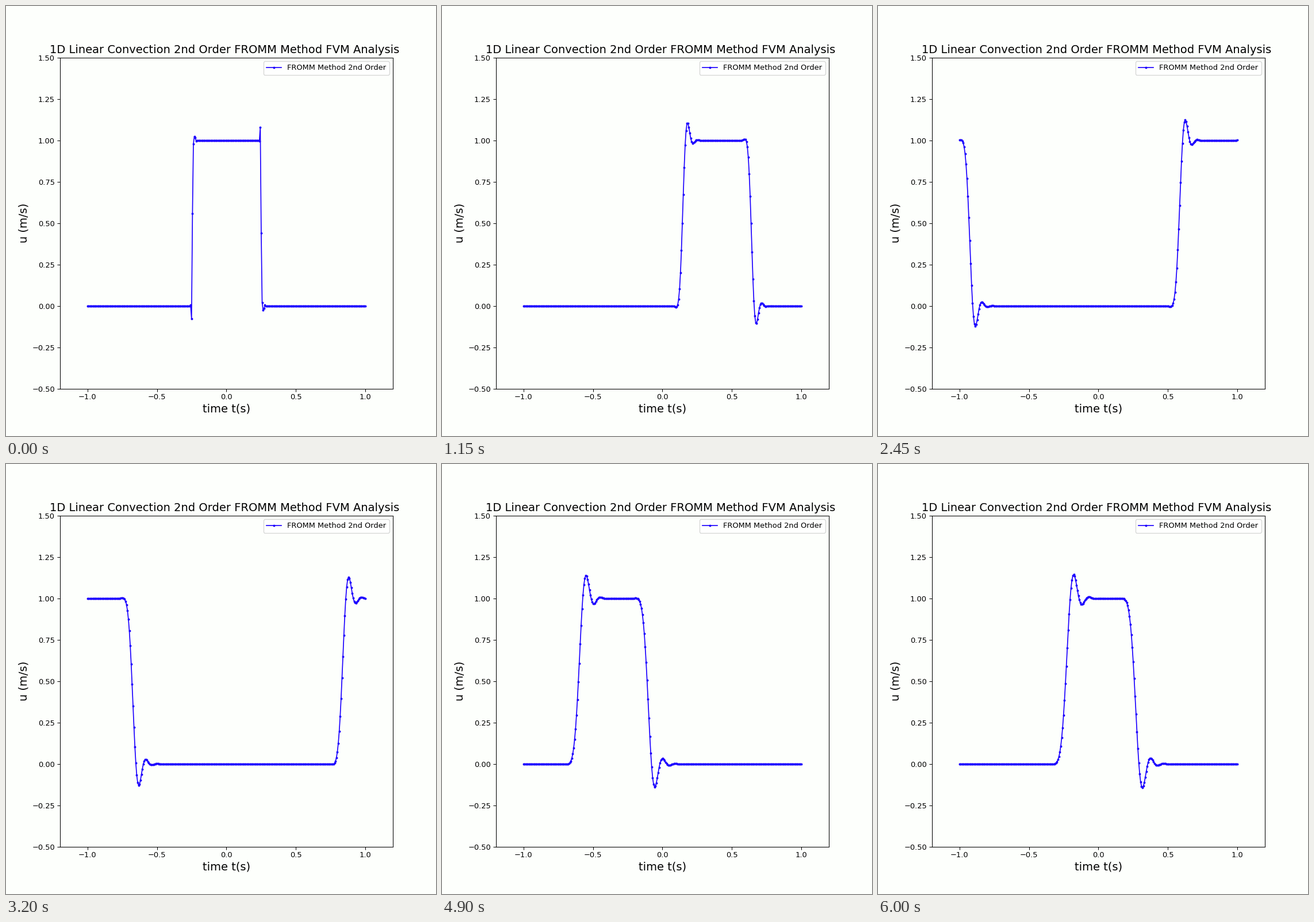
A matplotlib script for the animation above (6.05 s loop, 748 px wide and 748 px high).

```python
import numpy as np
import matplotlib.pyplot as plt
from matplotlib.animation import FuncAnimation

plt.rcParams["font.family"] = "DejaVu Sans"

CELLS = 300
CFL = 0.5
STEPS_PER_FRAME = 5
FRAMES = 121
PAPER = "#fdfffc"
BLUE = "#1c00ff"


def flux_balance(u):
    """Fromm reconstruction for unit wave speed on a periodic grid."""
    slope = (np.roll(u, -1) - np.roll(u, 1)) / 2
    face = u + slope / 2
    return np.roll(face, 1) - face


def rk3_step(u):
    u1 = u + CFL * flux_balance(u)
    u2 = 0.75 * u + 0.25 * (u1 + CFL * flux_balance(u1))
    return u / 3 + 2 / 3 * (u2 + CFL * flux_balance(u2))


def solve(u):
    history = []
    for step in range((FRAMES - 1) * STEPS_PER_FRAME + 1):
        u = rk3_step(u)
        if step % STEPS_PER_FRAME == 0:
            history.append(u)
    return history


x = np.linspace(-1, 1, CELLS)
states = solve(np.where(np.abs(x) <= 0.25, 1.0, 0.0))

fig, ax = plt.subplots(figsize=(8, 8), dpi=93.5, facecolor=PAPER)
ax.set_facecolor(PAPER)
line, = ax.plot(x, states[0], "o-", color=BLUE, linewidth=1.3, markersize=2,
                label="FROMM Method 2nd Order")
ax.set_xlim(-1.2, 1.2)
ax.set_ylim(-0.5, 1.5)
ax.set_xticks(np.arange(-1, 1.1, 0.5))
ax.tick_params(pad=3)
# The trailing space sets the title slightly left of centre.
ax.set_title("1D Linear Convection 2nd Order FROMM Method FVM Analysis ",
             fontsize=15)
ax.set_xlabel("time t(s)", fontsize=15, labelpad=3)
ax.set_ylabel("u (m/s)", fontsize=15)
ax.legend(loc="upper right")


def draw(i):
    line.set_ydata(states[i])
    return line,


anim = FuncAnimation(fig, draw, frames=FRAMES, interval=50, repeat=True)
plt.show()
```
